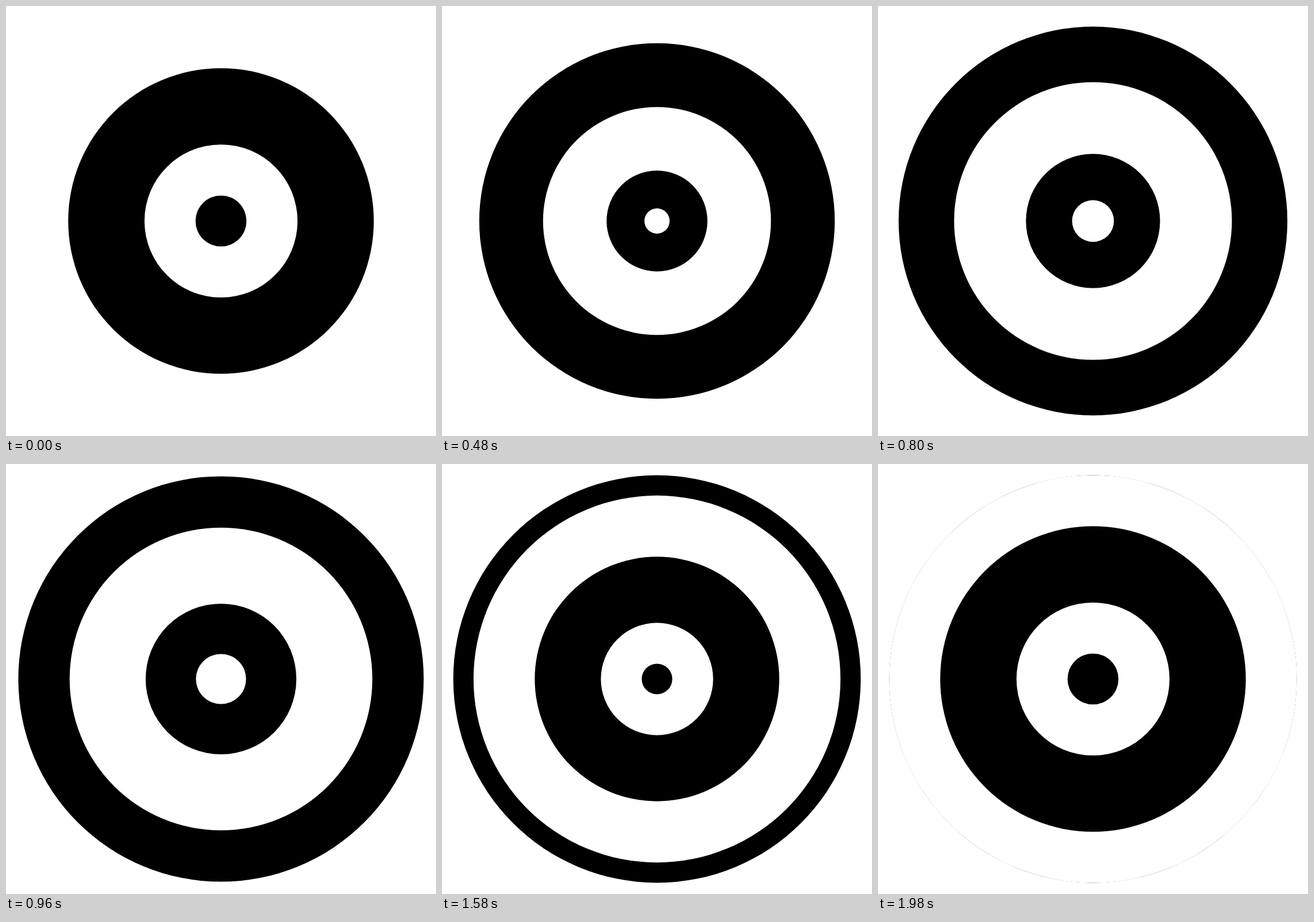
An HTML page with a canvas that plays this animation: 748x748 px, repeating every 2 s.

```html
<!DOCTYPE html>
<html>
<head>
<meta charset="utf-8">
<style>
  html, body { margin: 0; height: 100%; overflow: hidden; background: #fff; }
  canvas { display: block; }
</style>
</head>
<body>
<canvas width="748" height="748"></canvas>
<script>
  const ctx = document.querySelector('canvas').getContext('2d');
  const SIZE = 748, CENTER = SIZE / 2, UNIT = 354.4 / 8;
  const STEP = 20, STEPS = 100, MID = 49, END = STEPS - 1;

  // Radii in units at the start, middle and end; colours alternate from black
  const discs = [[6, 8, 8], [3, 6, 8], [1, 3, 6], [0, 1, 3], [0, 0, 1]];

  const mix = (a, b, p) => a + (b - a) * p;

  function draw(time) {
    const step = Math.floor(time / STEP) % STEPS;
    ctx.fillStyle = '#fff';
    ctx.fillRect(0, 0, SIZE, SIZE);
    discs.forEach(([start, mid, end], i) => {
      const units = step < MID
        ? mix(start, mid, step / MID)
        : mix(mid, end, (step - MID) / (END - MID));
      if (units <= 0) return;
      const isWhite = i % 2;
      ctx.fillStyle = isWhite ? '#fff' : '#000';
      ctx.beginPath();
      ctx.arc(CENTER, CENTER, units * UNIT + (isWhite ? 0.2 : 0), 0, 2 * Math.PI);
      ctx.fill();
    });
  }

  const begin = performance.now();
  function loop() {
    draw(performance.now() - begin);
    requestAnimationFrame(loop);
  }
  loop();
</script>
</body>
</html>
```
